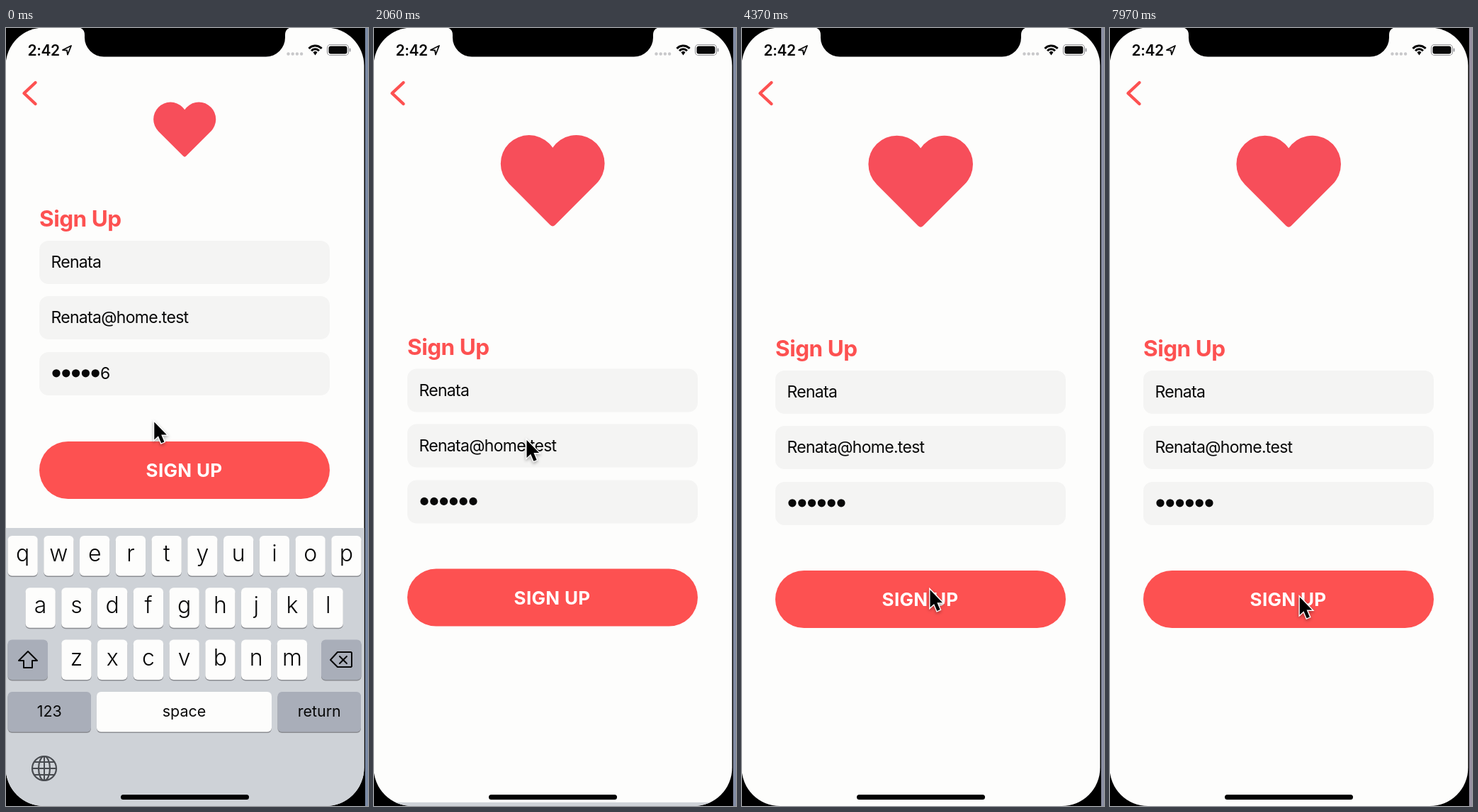
An HTML page with a canvas that plays this animation: 511 px wide and 1097 px high, repeating every 7.99 s.

```html
<!DOCTYPE html>
<html lang="en">
<head>
<meta charset="utf-8">
<title>Sign Up</title>
<style>
html, body { margin: 0; width: 100%; height: 100%; overflow: hidden; background: #000; }
canvas { display: block; }
</style>
</head>
<body>
<canvas id="stage" width="511" height="1097"></canvas>
<script>
const ctx = document.getElementById('stage').getContext('2d');
const LOOP = 7990, RED = '#fd5151', HEART = '#f74e5a', INK = '#080808', PAPER = '#fdfdfc';
const start = performance.now();
const clamp = v => Math.max(0, Math.min(1, v));
const ease = v => { v = clamp(v); return v * v * (3 - 2 * v); };
const mix = (a, b, p) => a + (b - a) * p;

function box(x, y, w, h, r, fill) {
  ctx.fillStyle = fill;
  ctx.beginPath();
  ctx.roundRect(x, y, w, h, r);
  ctx.fill();
}

function text(str, x, y, size, weight, fill, align = 'left', spacing = 0) {
  ctx.font = `${weight} ${size}px Inter, "Liberation Sans", sans-serif`;
  ctx.letterSpacing = spacing + 'px';
  ctx.textAlign = align;
  ctx.fillStyle = fill;
  ctx.fillText(str, x, y);
}

function dot(x, y, r, fill) {
  ctx.fillStyle = fill;
  ctx.beginPath();
  ctx.arc(x, y, r, 0, 7);
  ctx.fill();
}

function line(points, width, color, closed) {
  ctx.beginPath();
  points.forEach(([x, y]) => ctx.lineTo(x, y));
  if (closed) ctx.closePath();
  ctx.lineWidth = width;
  ctx.strokeStyle = color;
  ctx.stroke();
}

function ring(x, y, rx, ry, a = 0, b = Math.PI * 2) {
  ctx.beginPath();
  ctx.ellipse(x, y, rx, ry, 0, a, b);
  ctx.stroke();
}

// Pictures advance in groups of three, held 20, 20 and 100 ms.
function stepAt(t) {
  const u = t + (t >= 2510 ? 10 : 20), r = u % 140;
  return Math.floor(u / 140) * 3 + (r < 20 ? 0 : r < 40 ? 1 : 2);
}

function heartShape(size, alpha) {
  if (size <= 0) return;
  ctx.save();
  ctx.scale(size, size);
  ctx.globalAlpha = alpha;
  ctx.fillStyle = HEART;
  ctx.beginPath();
  ctx.arc(-33.5, -19, 40.3, Math.PI * 0.75, -0.59);
  ctx.arc(33.5, -19, 40.3, Math.PI + 0.59, Math.PI * 2.25);
  ctx.lineTo(3.5, 68);
  ctx.quadraticCurveTo(0, 71.5, -3.5, 68);
  ctx.fill();
  ctx.restore();
}

function heart(n, p) {
  const phase = ((n - 27 + 4) % 53 + 53) % 53;
  const scale = mix(0.597, 1, p);
  ctx.save();
  ctx.translate(252.2, mix(140, 211, p));
  ctx.scale(scale, scale);
  if (phase < 10) heartShape(0.992, 0.52);
  heartShape(phase < 10 ? ease((phase - 6) / 4) : 1, 1);
  if (phase > 7 && phase < 15) {
    const out = mix(60, 95, clamp((phase - 7) / 4));
    const r = 4.4 * clamp((15 - phase) / 3);
    for (let i = -1; i < 6; i++) {
      const a = i * Math.PI / 4;
      dot(out * Math.cos(a), out * Math.sin(a), r, HEART);
    }
  }
  ctx.restore();
}

function form(t, p) {
  ctx.save();
  ctx.translate(0, 183 * p);
  text('Sign Up', 47, 280, 31.5, 700, RED, 'left', -0.5);
  [300, 378, 457].forEach(y => box(47, y, 410, 61, 13, '#f4f4f3'));
  text('Renata', 63.5, 338, 23, 400, INK, 'left', -0.7);
  text('Renata@home.test', 63.5, 416, 23, 400, INK, 'left', -0.7);
  const hidden = t < 700 ? 5 : 6;
  for (let i = 0; i < hidden; i++) dot(71 + 13.8 * i, 486.8, 5.6, INK);
  if (hidden < 6) text('6', 133, 495, 23, 400, INK);
  ctx.translate(0, -p);
  box(47, 583, 410, 81, 40.5, RED);
  text('SIGN UP', 251.5, 633, 26, 700, '#fff', 'center', 0.3);
  ctx.restore();
}

function key(x, y, w, label, size = 32, weight = 300, fill = PAPER) {
  box(x, y + 1.5, w, 56.5, 6, '#8b8d92');
  box(x, y, w, 56.5, 6, fill);
  if (label) text(label, x + w / 2, y + (size > 30 ? 36 : 34.5), size, weight, INK, 'center');
}

function keyboard(p) {
  const grey = '#a9aeb9';
  ctx.save();
  ctx.translate(0, 392 * p);
  ctx.fillStyle = '#ced2d7';
  ctx.fillRect(0, 705, 506, 400);
  [['qwertyuiop', 2.5], ['asdfghjkl', 27.5], ['zxcvbnm', 78.3]].forEach(([row, x], i) =>
    [...row].forEach((c, j) => key(x + 50.75 * j, 716 + 73.3 * i, 42.3, c)));
  key(2.5, 862.6, 56.5, '', 0, 0, grey);
  key(445, 862.6, 56.5, '', 0, 0, grey);
  key(2.5, 936, 117.5, '123', 21.5, 400, grey);
  key(128, 936, 247, 'space', 21.5, 400);
  key(383.5, 936, 117.5, 'return', 21.5, 400, grey);
  line([[31, 879], [44, 892], [37, 892], [37, 902], [25, 902], [25, 892], [18, 892]], 2, INK, true);
  line([[458, 891], [468, 880], [487, 880], [488, 881], [488, 900], [487, 901], [468, 901]], 2, INK, true);
  line([[471, 886], [481, 896]], 2, INK);
  line([[481, 886], [471, 896]], 2, INK);
  ctx.strokeStyle = '#484b50';
  ctx.lineWidth = 2.2;
  ring(54, 1044, 17, 17);
  ring(54, 1044, 8, 17);
  line([[54, 1027], [54, 1061]], 2, '#484b50');
  line([[37, 1044], [71, 1044]], 2, '#484b50');
  line([[40, 1035], [68, 1035]], 2, '#484b50');
  line([[40, 1053], [68, 1053]], 2, '#484b50');
  ctx.restore();
}

function statusBar() {
  text('2:42', 30.5, 38.5, 21, 600, INK, 'left', -0.4);
  line([[80, 31], [92, 25], [87, 37.5], [86, 31.5]], 1.8, INK, true);
  for (let i = 0; i < 4; i++) dot(398.5 + 6.2 * i, 36.5, 2.2, '#c8c8ca');
  ctx.strokeStyle = INK;
  ctx.lineWidth = 3;
  ctx.lineCap = 'butt';
  ring(436.5, 37, 12, 12, -Math.PI * 0.77, -Math.PI * 0.23);
  ring(436.5, 37, 7.2, 7.2, -Math.PI * 0.77, -Math.PI * 0.23);
  ctx.fillStyle = INK;
  ctx.beginPath();
  ctx.moveTo(436.5, 38.5);
  ctx.arc(436.5, 37, 4, -Math.PI * 0.77, -Math.PI * 0.23);
  ctx.fill();
  ctx.lineCap = 'round';
  ctx.lineWidth = 1.2;
  ctx.strokeStyle = '#98989b';
  ctx.beginPath();
  ctx.roundRect(453.5, 23.5, 30, 15, 4.5);
  ctx.stroke();
  box(455.5, 25.5, 26, 11, 3, INK);
  box(484.7, 28.5, 1.8, 5, 1, '#98989b');
  line([[41.5, 77], [25.5, 92], [41.5, 107]], 4.4, RED);
}

function notch() {
  ctx.fillStyle = '#000';
  ctx.beginPath();
  ctx.moveTo(101, -1);
  ctx.quadraticCurveTo(111, 0, 111, 10);
  ctx.arcTo(111, 40.5, 141, 40.5, 27);
  ctx.lineTo(364, 40.5);
  ctx.arcTo(394, 40.5, 394, 10, 27);
  ctx.lineTo(394, 10);
  ctx.quadraticCurveTo(394, 0, 404, -1);
  ctx.fill();
}

function pointer(t) {
  const moves = [[0, 300, 0, -3], [1850, 2750, 45, 205], [2950, 3600, 9.5, 27], [4100, 4700, 4, 18]];
  let x = 209.3, y = 555.5;
  moves.forEach(([from, to, dx, dy]) => {
    const p = ease((t - from) / (to - from));
    x += dx * p;
    y += dy * p;
  });
  ctx.save();
  ctx.translate(x, y);
  ctx.scale(1.06, 1.06);
  ctx.shadowColor = 'rgba(0,0,0,.35)';
  ctx.shadowBlur = 4;
  ctx.shadowOffsetY = 2;
  line([[0, 0], [0, 23.5], [5.3, 18.6], [9.3, 28], [13.3, 26.3], [9.3, 17], [16.5, 17]], 2.6, '#fff', true);
  ctx.shadowColor = 'transparent';
  ctx.fillStyle = '#000';
  ctx.fill();
  ctx.restore();
}

function draw(t) {
  const n = stepAt(t);
  const x = Math.max(0, (n - 25.9) * 0.349);
  const p = 1 - (1 + x) * Math.exp(-x);
  const tint = t / LOOP;
  ctx.fillStyle = '#000';
  ctx.fillRect(0, 0, 511, 1097);
  ctx.fillStyle = `rgb(${mix(122, 150, tint)},${mix(137, 144, tint)},${mix(163, 160, tint)})`;
  ctx.fillRect(507, 0, 4, 1097);

  ctx.save();
  ctx.beginPath();
  ctx.roundRect(-0.5, -0.5, 506, 1097.5, 54);
  ctx.clip();
  ctx.fillStyle = PAPER;
  ctx.fillRect(0, 0, 511, 1097);
  ctx.lineCap = ctx.lineJoin = 'round';
  statusBar();
  heart(n, p);
  form(t, p);
  if (p < 0.999) keyboard(p);
  box(162, 1081, 181, 7, 3.5, '#000');
  ctx.restore();
  notch();
  pointer(t);
}

function tick(now) {
  draw(Math.max(0, now - start) % LOOP);
  requestAnimationFrame(tick);
}
draw(0);
requestAnimationFrame(tick);
</script>
</body>
</html>
```
